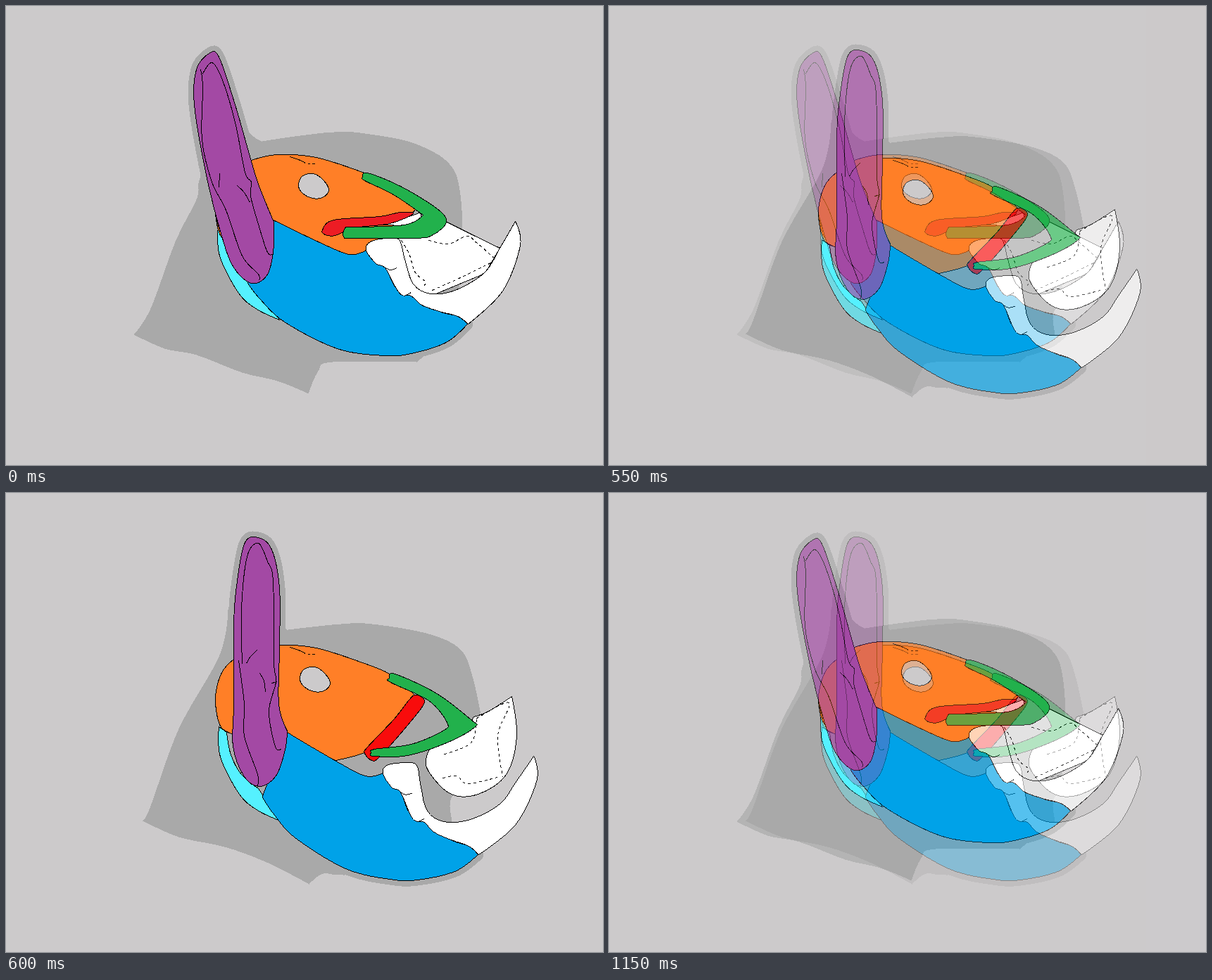
An HTML page for the animation above (1200 ms loop, 848 by 653 pixels).

```html
<!DOCTYPE html>
<html lang="en">
<head>
<meta charset="utf-8">
<title>Skull kinesis</title>
<style>
  html, body { margin: 0; width: 100%; height: 100%; overflow: hidden; background: #cccacb; }
  svg { display: block; width: 848px; height: 653px; shape-rendering: crispEdges; }
</style>
</head>
<body>
<svg viewBox="0 0 848 653"></svg>
<script>
const BACK = '#cccacb', SHADOW = '#a9a9a9', CYAN = '#55f1ff', BLUE = '#00a2e8', WHITE = '#fff',
  ORANGE = '#ff7f27', GREEN = '#22b14c', PURPLE = '#a349a4';

function add(parent, tag, attrs) {
  const node = document.createElementNS('http://www.w3.org/2000/svg', tag);
  for (const name in attrs) node.setAttribute(name, attrs[name]);
  return parent.appendChild(node);
}

// Smooth curve through "x,y" points; a trailing "!" makes a corner.
function curve(text, closed) {
  const pts = text.trim().split(/\s+/).map(t => {
    const [x, y] = t.replace('!', '').split(',').map(Number);
    return { x, y, corner: t.endsWith('!') };
  });
  const n = pts.length;
  const at = i => closed ? pts[(i + n) % n] : pts[Math.max(0, Math.min(n - 1, i))];
  const handle = (i, sign) => {
    const p = at(i), a = at(i - 1), b = at(i + 1), k = p.corner ? 0 : sign / 6;
    return `${p.x + (b.x - a.x) * k},${p.y + (b.y - a.y) * k}`;
  };
  let d = `M${pts[0].x},${pts[0].y}`;
  for (let i = 0; i < n - !closed; i++)
    d += `C${handle(i, 1)} ${handle(i + 1, -1)} ${at(i + 1).x},${at(i + 1).y}`;
  return d;
}

function layer(parent, transform) {
  const group = add(parent, 'g', { transform });
  return {
    group,
    shape: (fill, pts, stroke = '#000') => add(group, 'path', { d: curve(pts, true) + 'Z', fill, stroke }),
    halo: pts => add(group, 'path',
      { d: curve(pts, true) + 'Z', fill: SHADOW, stroke: SHADOW, 'stroke-width': 16, 'stroke-linejoin': 'round' }),
    line: (pts, dash = 'none') => add(group, 'path',
      { d: curve(pts), fill: 'none', stroke: '#000', 'stroke-dasharray': dash })
  };
}

const JAW = `371,300! 443,335 487,353 511,347! 538,372 553,400 575,412 615,434 641,441 655,452! 625,478 575,494
  537,497 470,487 395,449 360,416 343,394!`;
const HORN = `511,347 517,335 540,330 558,332 566,360 578,395 603,409 640,403 680,378 701,344 723,306! 730,340
  705,405 656,452! 641,441 615,434 590,425 575,412 562,411 553,400 538,372 525,366`;
const SKULL = `322,232 348,219 385,211 440,215 506,236 548,254 584,286! 520,354 503,366 468,375! 399,345!
  323,338! 304,326 297,288 305,252`;
const EYE = '415,255 420,242 436,238 451,248 458,262 449,272 435,273 421,266';
const QUADRATE = '301,312! 303,355 330,408 356,431 388,446! 357,400! 333,380 318,352 312,320!';

// Skull, jaw and quadrate are rigid parts shared by both poses.
function drawPose(pose) {
  const root = layer(document.querySelector('svg'), 'translate(.5 .5)');
  const part = transform => layer(root.group, transform);
  add(root.group, 'rect', { x: -1, y: -1, width: 850, height: 655, fill: BACK });
  root.shape(SHADOW, pose.shadow, 'none');
  root.halo(pose.ear);
  part(pose.jaw).halo(JAW);

  part(pose.quadrate).shape(CYAN, QUADRATE);
  const skull = part(pose.skull);
  skull.shape(ORANGE, SKULL);
  skull.line('403,214 415,218 425,223');
  skull.line('428,224 439,224', '4 2');
  part(pose.eye).shape(BACK, EYE);

  root.shape(WHITE, pose.snout);
  for (const pts of pose.seams) root.line(pts, '4 4');

  const jaw = part(pose.jaw);
  jaw.shape(BLUE, JAW);
  jaw.shape(WHITE, HORN);
  jaw.line('538,372 546,375 555,372');
  jaw.line('568,411 575,407');

  if (pose.mouth) root.shape(WHITE, pose.mouth);
  root.shape(pose.red, pose.rod);
  root.shape(GREEN, pose.beak);
  root.shape(PURPLE, pose.ear);
  for (const pts of pose.creases) root.line(pts);
  return root.group;
}

drawPose({
  jaw: '', skull: '', eye: '', quadrate: '', red: '#ed1c24',
  shadow: `316,100! 340,172 363,192! 410,185 465,179 510,181 585,197 637,235 648,315! 640,460! 583,506! 463,506
    443,519 429,551! 385,533 335,521 270,496 225,487 181,467! 205,430 240,335 270,275 272,255!`,
  snout: '545,331! 626,307! 660,324 701,344! 680,380! 603,412! 565,395!',
  seams: ['600,333 628,338 654,327 670,338 694,359', '605,404 645,386 690,364', '561,333 572,352 581,379 595,392 590,402'],
  mouth: '535,311! 578,297 588,293! 590,304! 565,312!',
  rod: '449,318 465,304 530,299 560,293 578,295 545,309 495,315 467,326 453,325',
  beak: `506,243 513,237 560,256 612,288 625,307 606,325 580,330 480,330! 478,323 482,314! 565,311 592,297!
    550,268 509,248`,
  ear: `267,140 270,90 288,67 302,72 325,140 345,210 358,253 380,307! 379,350 370,383 348,394 322,370 304,320
    284,240`,
  creases: [
    '278,97 292,80 307,105 325,165 339,236 348,250 347,270 358,310 371,350 380,352',
    '276,90 279,115 278,190 292,250 312,290 335,355 358,381 359,390',
    '303,238 302,258', '328,255 338,265 346,279', '297,298 304,322'
  ]
});

const open = drawPose({
  jaw: 'translate(15 62) rotate(4.5 655 452)', skull: 'translate(0 5)', eye: 'translate(2 9)',
  quadrate: 'translate(1 20)', red: '#f80c0c',
  shadow: `391,125! 395,185 400,194! 475,186 520,186 600,200 645,222 662,260 674,315! 650,420! 634,430 630,445
    633,465! 600,540! 480,543 450,541 430,556! 370,525 310,503 245,489 192,465! 203,450 245,335 303,230 315,165!`,
  snout: '664,318! 685,310 718,289! 725,345 710,400 670,428 630,427 597,390 602,362! 650,340!',
  seams: ['668,322 660,355 620,372', '668,320 714,298 698,345 705,404', '620,405 640,402 655,413 698,404'],
  rod: '572,294 580,287 590,290 593,300 570,330 530,375 519,380 509,370 513,361 550,322',
  beak: `544,263 552,257 610,284 660,322 666,332 630,353 570,373 522,374 518,369 523,364 575,357 620,338 626,326
    600,295 546,269`,
  ear: `323,190 326,140 338,72 358,63 377,80 388,135 388,220 387,300 399,338! 396,365 383,402 360,417 338,403
    322,360 323,300`,
  creases: [
    '335,243 334,165 342,90 358,71 371,97 379,125 380,240 383,268 373,310 382,360 391,364',
    '330,238 338,300 338,345 357,400 357,416',
    '341,242 347,232 356,223', '360,256 366,267 368,283', '377,270 385,268'
  ]
});

// Hold each pose for 500 ms, with a two-step dissolve in between.
function thirds(t) {
  const step = t => Math.max(0, Math.min(3, Math.floor((t - 450) / 50)));
  return t < 600 ? step(t) : 3 - step(t - 600);
}

const start = performance.now();
function tick() {
  open.setAttribute('opacity', thirds((performance.now() - start) % 1200) / 3);
  requestAnimationFrame(tick);
}
tick();
</script>
</body>
</html>
```
